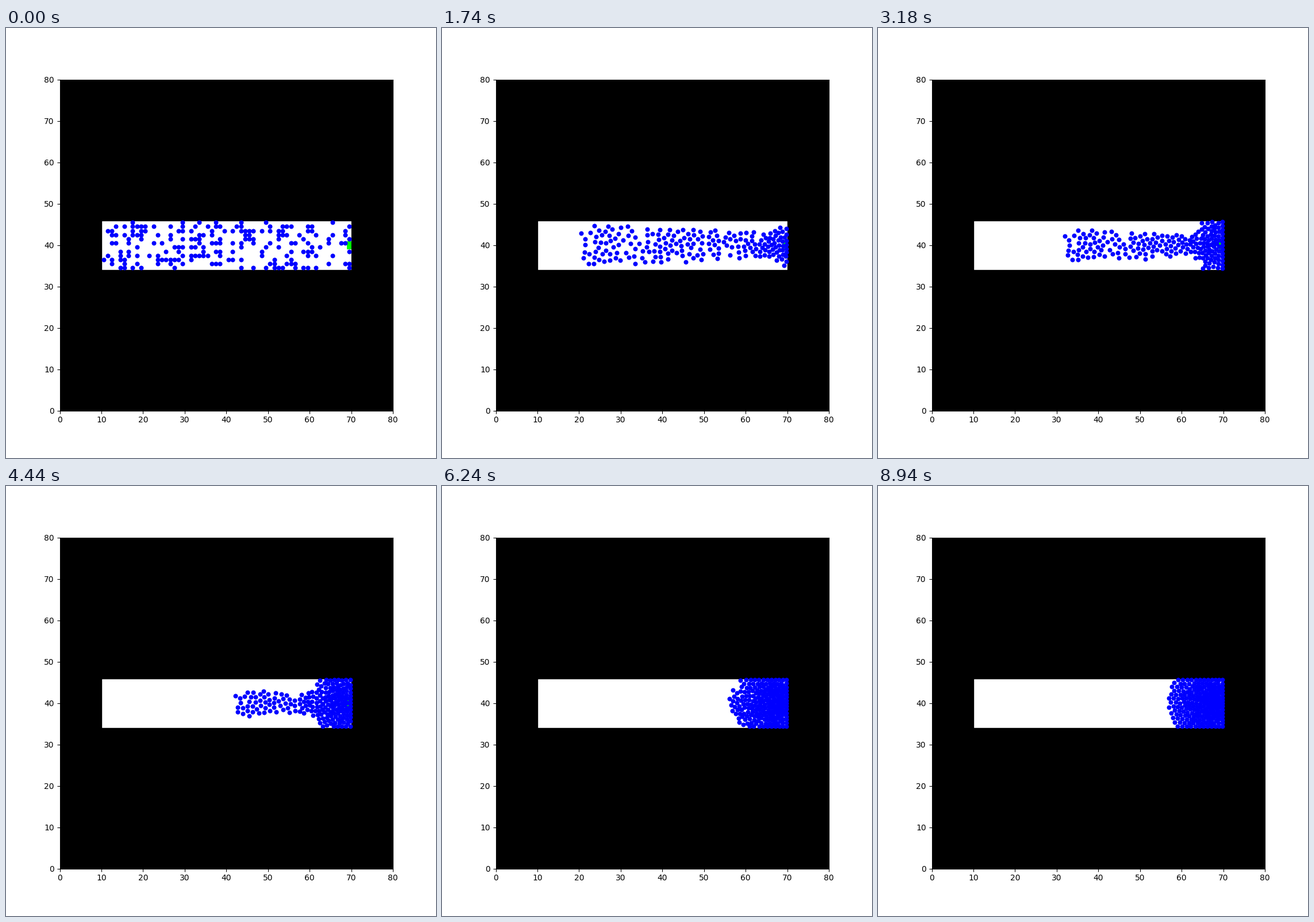
These frames come from a looping animation (748x748 px, 9000 ms). A matplotlib script:

```python
import numpy as np
import matplotlib.pyplot as plt
from matplotlib.animation import FuncAnimation
from matplotlib.patches import Rectangle

FRAMES, INTERVAL, SUBSTEPS = 150, 60, 8
LEFT, RIGHT, BOTTOM, TOP = 10, 70, 34, 46
EXIT = np.array([70.0, 40.0])
AGENTS = 198
SPEED, RELAX = 0.489, 9.2      # desired speed per frame, reaction time in frames
REACH, PUSH = 1.25, 2.1        # agent repulsion
WALL_REACH, WALL_PUSH = 1.0, 0.2


def start_positions():
    """Random cell centres, with the exit cells left free."""
    cells = np.array([(x, y) for x in range(LEFT, RIGHT)
                      for y in range(BOTTOM, TOP)]) + 0.5
    cells = cells[np.hypot(*(cells - EXIT).T) > 1]
    rng = np.random.default_rng(4)
    return rng.choice(cells, AGENTS, replace=False)


def wall_force(gap):
    return WALL_PUSH * np.maximum(WALL_REACH - gap, 0) ** 2


def acceleration(pos, vel):
    aim = EXIT - pos
    aim /= np.maximum(np.hypot(*aim.T), 0.5)[:, None]
    acc = (SPEED * aim - vel) / RELAX

    x, y = pos.T
    dx, dy = x[:, None] - x, y[:, None] - y
    dist = np.sqrt(dx * dx + dy * dy) + 1e-6
    force = PUSH * np.maximum(REACH - dist, 0) ** 2 / dist
    acc[:, 0] += (force * dx).sum(axis=1) + wall_force(x - LEFT)
    acc[:, 1] += (force * dy).sum(axis=1)
    acc[:, 1] += wall_force(y - BOTTOM) - wall_force(TOP - y)
    return acc


def simulate():
    pos = start_positions()
    vel = np.zeros_like(pos)
    lower = np.array([LEFT + 0.4, BOTTOM + 0.4])
    upper = np.array([RIGHT - 0.3, TOP - 0.4])
    dt = 1 / SUBSTEPS
    path = [pos]
    for _ in range(FRAMES - 1):
        for _ in range(SUBSTEPS):
            vel = np.clip(vel + dt * acceleration(pos, vel), -1, 1)
            moved = pos + dt * vel
            pos = np.clip(moved, lower, upper)
            vel[pos != moved] = 0
        path.append(pos)
    path[0] = start_positions()
    return path


path = simulate()

fig, ax = plt.subplots(figsize=(7.48, 7.48), dpi=100)
ax.set_xlim(0, 80)
ax.set_ylim(0, 80)

ax.add_patch(Rectangle((69, 39), 1, 2, color="lime", lw=0))
walls = [
    (0, 0, 80, BOTTOM),
    (0, TOP, 80, 80 - TOP),
    (0, BOTTOM, LEFT, TOP - BOTTOM),
    (RIGHT, BOTTOM, 80 - RIGHT, TOP - BOTTOM),
]
for x, y, w, h in walls:
    ax.add_patch(Rectangle((x, y), w, h, color="black", lw=1))

agents = ax.scatter(*path[0].T, s=33, c="blue", linewidths=0, zorder=3)


def update(frame):
    agents.set_offsets(path[frame])
    return (agents,)


anim = FuncAnimation(fig, update, frames=FRAMES, interval=INTERVAL,
                     repeat=True, repeat_delay=0)
plt.show()
```
